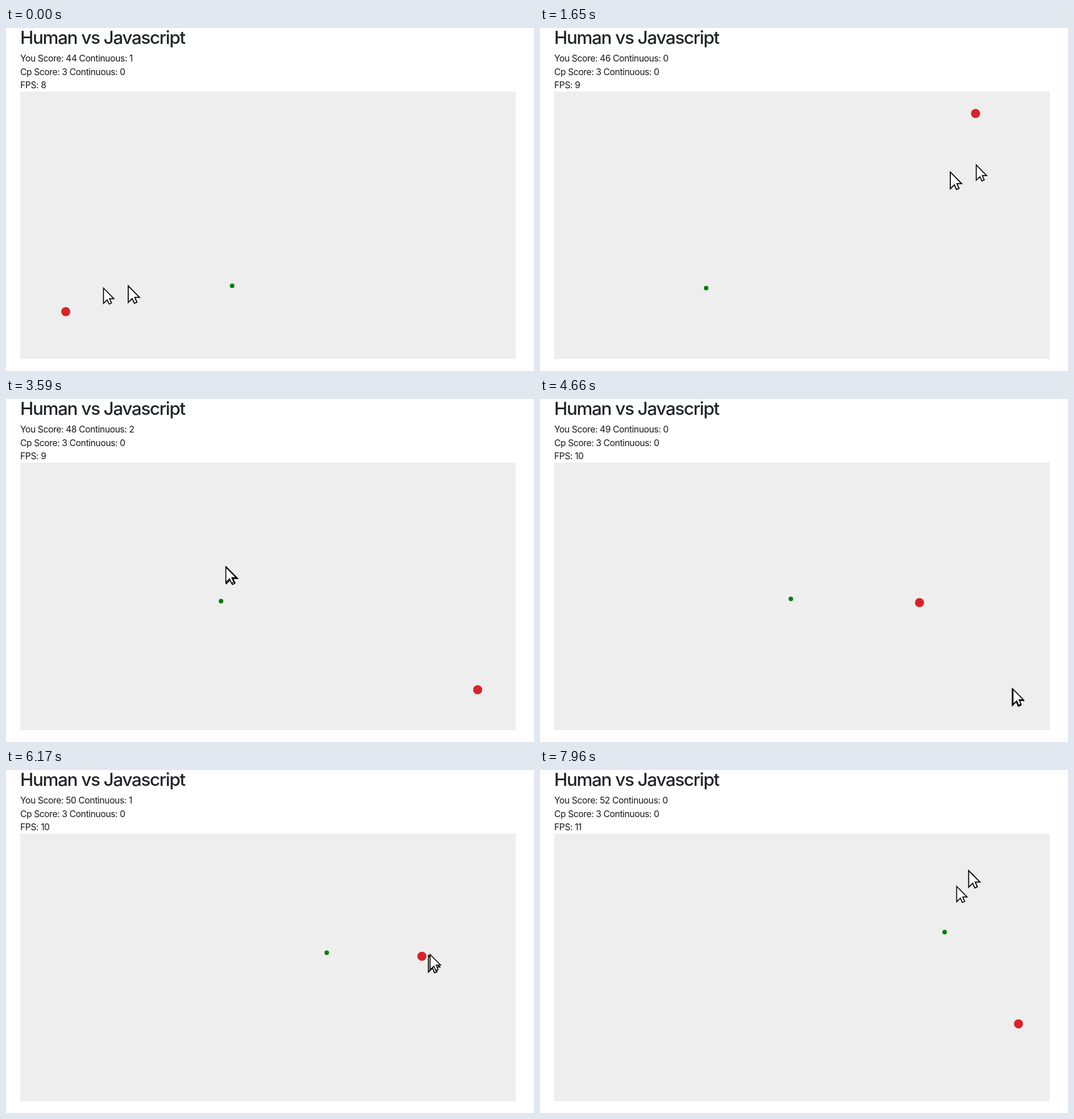
These frames come from a looping animation (928 by 604 pixels, 8 s). An HTML page:

```html
<!DOCTYPE html>
<html lang="en">
<head>
<meta charset="utf-8">
<title>Human vs Javascript</title>
<style>
  html, body { margin: 0; width: 100%; height: 100%; overflow: hidden; background: #fff; }
  svg { display: block; }
  text { font: 15.7px Inter, Roboto, sans-serif; letter-spacing: -.43px; fill: #16181b; }
  .title { font-size: 31.4px; font-weight: 500; letter-spacing: -1.34px; fill: #212529; }
  .pointer { fill: #fff; stroke: #000; stroke-width: 1.8; }
</style>
</head>
<body>
<svg width="928" height="604" viewBox="0 0 928 604">
  <defs>
    <path id="arrow" d="M.4 1V30.4L7.5 23.5 11.2 31.8 15.7 29.8 12 21.4H20.3Z"/>
  </defs>
  <text class="title" x="25" y="28">Human vs Javascript</text>
  <text id="you" x="25" y="59"></text>
  <text x="25" y="82.5">Cp Score: 3 Continuous: 0</text>
  <text id="fps" x="25" y="106"></text>
  <rect x="25" y="112" width="871" height="471" fill="#eee"/>
  <circle id="food" r="8" fill="#d8232a"/>
  <circle id="bot" r="4" fill="#008000"/>
  <use id="trail" class="pointer" href="#arrow"/>
  <use id="lead" class="pointer" href="#arrow"/>
</svg>
<script>
const LOOP = 8000, HOLD = 240, STEP = 151.3;
const $ = id => document.getElementById(id);

// Key points: [time, x, y]
const foods = [
  [0, 105, 499.5], [500, 34, 437], [1140, 765.5, 150.5], [2500, 388, 290], [3560, 829, 512],
  [4620, 667, 358.5], [5680, 731, 328], [6280, 752, 172], [7800, 841, 447]
];
const mouse = [
  [-152, 215, 453], [0, 171, 457], [500, 105, 511], [1148, 32, 441], [1650, 767, 240],
  [2360, 766, 162], [3570, 386, 295], [4630, 831, 510], [5690, 667, 361],
  [6140, 745, 324], [7805, 753, 176], [7960, 732, 204]
];
const seeker = [
  [0, 397.5, 454], [1602, 292, 458], [2359, 315, 423], [3570, 378, 356],
  [4630, 441, 352], [7960, 711.5, 285.5]
];

const linear = u => u;
const easeOut = u => 1 - (1 - u) ** 3;

function along(path, t, ease) {
  const i = Math.max(1, path.findIndex(p => p[0] >= t));
  const [t0, x0, y0] = path[i - 1], [t1, x1, y1] = path[i];
  const k = ease((t - t0) / (t1 - t0));
  return [x0 + (x1 - x0) * k, y0 + (y1 - y0) * k];
}

function place(id, [x, y], scale = 1) {
  $(id).setAttribute('transform', `translate(${x} ${y}) scale(${scale})`);
}

function draw(now) {
  const time = now % LOOP;
  const t = time < HOLD ? 0 : HOLD + Math.floor((time - HOLD) / STEP) * STEP;
  const eaten = foods.findLastIndex(f => f[0] <= t);
  const score = 44 + eaten, won = score - 43;

  $('you').textContent = `You Score: ${score} Continuous: ${won % 3}`;
  $('fps').textContent = `FPS: ${8 + Math.floor(won / 3)}`;
  place('food', foods[eaten].slice(1));
  place('bot', along(seeker, t, linear));
  place('trail', along(mouse, t - STEP, easeOut));
  place('lead', along(mouse, t, easeOut), .92);
  requestAnimationFrame(draw);
}
requestAnimationFrame(draw);
</script>
</body>
</html>
```
